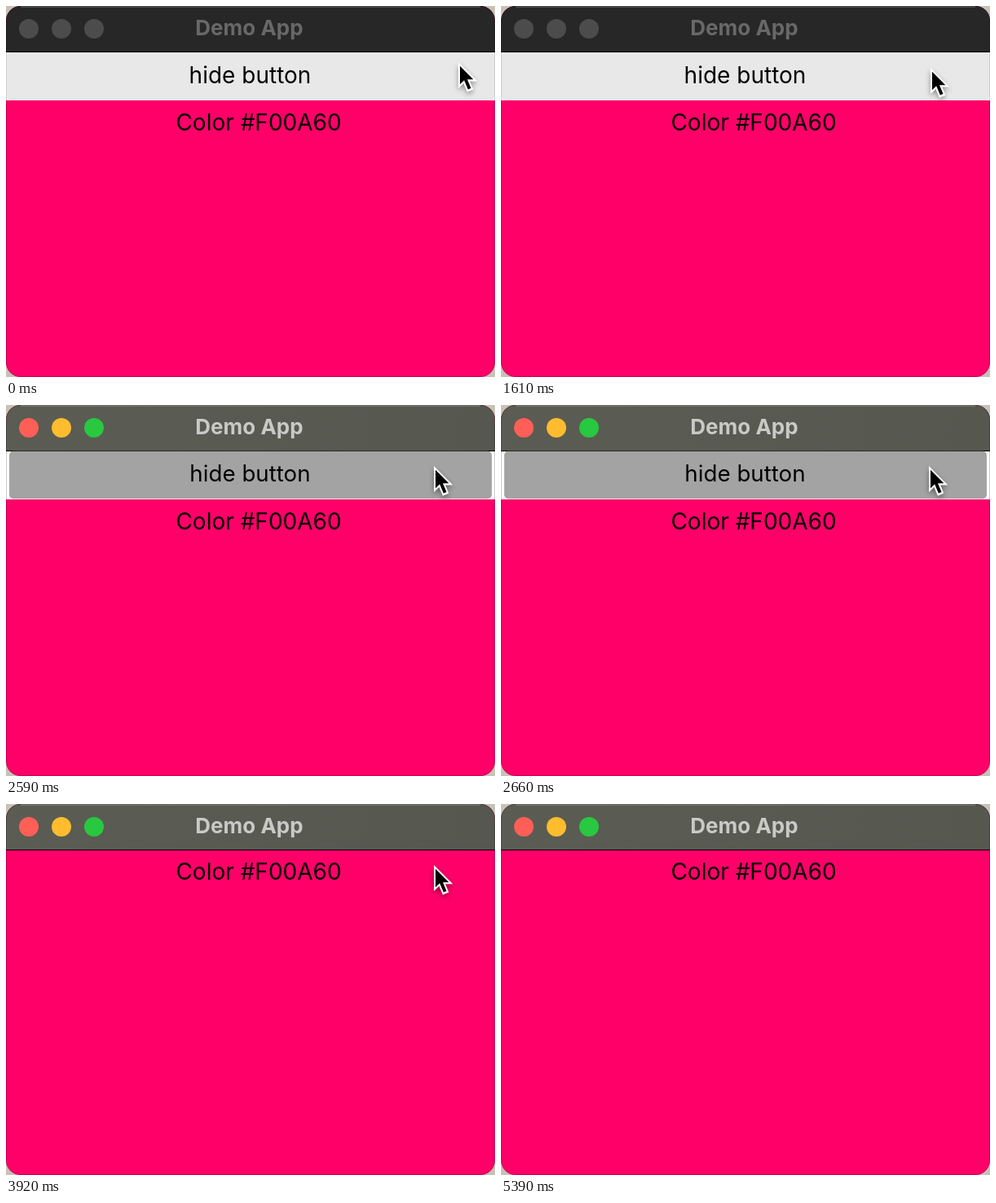
An HTML page for the animation above (6230 ms loop, 600 px wide and 456 px high).

```html
<!DOCTYPE html>
<html lang="en">
<head>
<meta charset="utf-8">
<title>Demo App</title>
<style>
  html, body { margin: 0; width: 100%; height: 100%; overflow: hidden; background: #c6c3b6; }
  svg { display: block; width: 600px; height: 456px; }
  text { font: 28px Inter, sans-serif; text-anchor: middle; }
  #title { font-weight: 700; font-size: 26px; fill: #686868; }
  #bar { fill: #272727; }
  .light { fill: #4c4c4c; }
  #face { fill: #e8e8e8; }
  .active #title { fill: #c9c9c6; }
  .active #bar { fill: url(#barTint); }
  .active .light { fill: var(--on); }
  .pressed #face { fill: #a3a3a3; }
</style>
</head>
<body>
<svg id="stage" viewBox="0 0 600 456">
  <defs>
    <clipPath id="frame"><rect width="600" height="456" rx="18"/></clipPath>
    <linearGradient id="barTint">
      <stop offset="0" stop-color="#5b5c53"/>
      <stop offset="1" stop-color="#56574f"/>
    </linearGradient>
    <filter id="shadow" x="-50%" y="-50%" width="200%" height="200%">
      <feDropShadow dx="0" dy="1.5" stdDeviation="1.5" flood-opacity=".4"/>
    </filter>
  </defs>
  <g clip-path="url(#frame)">
    <rect width="600" height="456" fill="#ff0069"/>
    <rect id="bar" width="600" height="56"/>
    <rect y="56" width="600" height="1" fill="#000"/>
    <circle class="light" cx="28" cy="28" r="12" style="--on:#ff5f57"/>
    <circle class="light" cx="68" cy="28" r="12" style="--on:#febc2e"/>
    <circle class="light" cx="108" cy="28" r="12" style="--on:#28c840"/>
    <text id="title" x="298.5" y="36">Demo App</text>
    <g id="button">
      <rect y="57" width="600" height="59" fill="#fff"/>
      <g id="content">
        <rect id="face" x="1" y="57" width="598" height="59" rx="5"/>
        <text x="299.5" y="95">hide button</text>
      </g>
    </g>
    <text id="label" x="310" y="153">Color #F00A60</text>
  </g>
  <rect x=".5" y=".5" width="599" height="455" rx="17.5" fill="none" stroke="#000" stroke-opacity=".2"/>
  <path d="M18 1H582" stroke="#fff" stroke-opacity=".22" stroke-width="1.5"/>
  <g id="cursor">
    <g transform="scale(2) translate(-8.2 -4.9)" filter="url(#shadow)">
      <path fill="#fff" d="M8.2 20.9V4.9L19.8 16.5H13L12.6 16.6ZM17.3 21.6L13.7 23.1L9 12L12.7 10.5Z"/>
      <path d="M9.2 7.3V18.5L12.2 15.6L12.6 15.5H17.4Z"/>
      <rect x="12.5" y="13.6" width="2" height="8" transform="matrix(.9221 -.3871 .3871 .9221 -5.7605 6.5909)"/>
    </g>
  </g>
</svg>
<script>
const LOOP = 6230, STEP = 70;
const PRESS = 2590, RELEASE = 2730, CURSOR_EXIT = 4130;

// Cursor stops: time, x, y
const path = [
  [0, 555, 69], [350, 535, 71], [840, 535, 71], [1400, 530, 74],
  [1610, 527, 76], [1960, 527, 76], [2520, 525, 75], [LOOP, 525, 75]
];

const el = id => document.getElementById(id);
const show = (id, visible) => el(id).setAttribute("visibility", visible ? "visible" : "hidden");

function cursorAt(time) {
  const i = path.findIndex(stop => stop[0] > time);
  const [t0, x0, y0] = path[i - 1], [t1, x1, y1] = path[i];
  const p = (time - t0) / (t1 - t0), eased = p * p * (3 - 2 * p);
  return [x0 + (x1 - x0) * eased, y0 + (y1 - y0) * eased].map(Math.round);
}

function draw(now) {
  const time = Math.floor((now % LOOP) / STEP) * STEP;
  const pressed = time >= PRESS && time < RELEASE;
  const hidden = time >= RELEASE;
  el("stage").classList.toggle("active", time >= PRESS);
  el("button").classList.toggle("pressed", pressed);
  el("content").setAttribute("transform",
    pressed ? "translate(300 86) scale(.99) translate(-300 -86.5)" : "");
  show("button", !hidden);
  el("label").setAttribute("y", hidden ? 93 : 153);
  show("cursor", time < CURSOR_EXIT);
  el("cursor").setAttribute("transform", `translate(${cursorAt(time)})`);
}

const start = performance.now();
function tick() {
  draw(performance.now() - start);
  requestAnimationFrame(tick);
}
tick();
</script>
</body>
</html>
```
